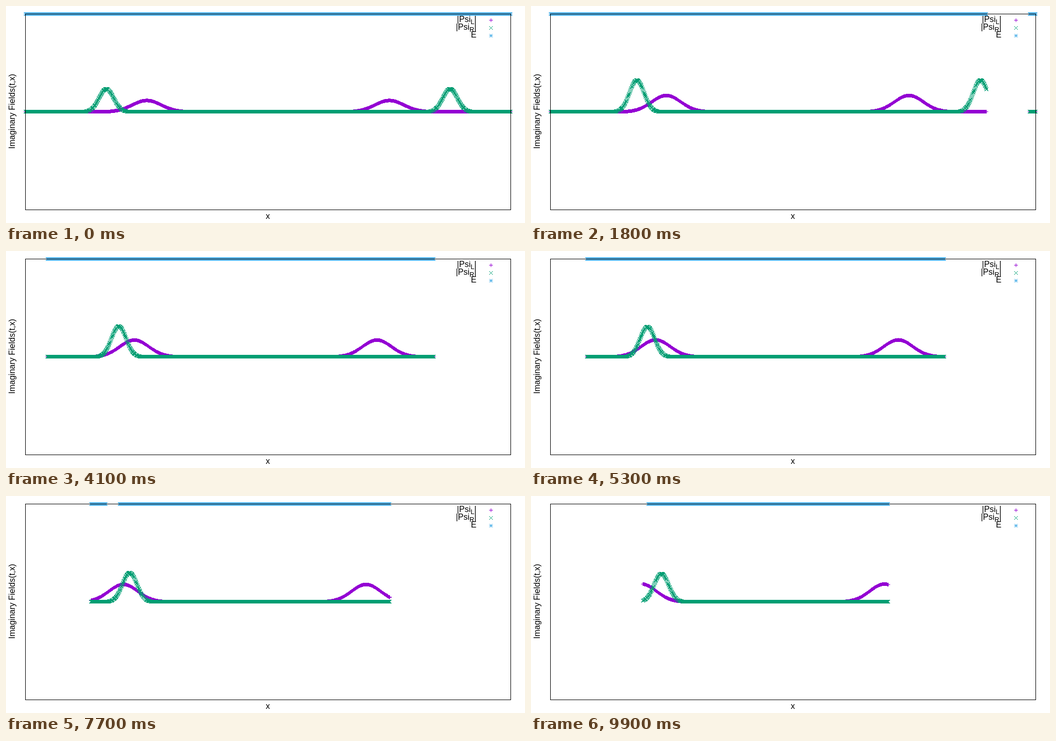
An HTML page with a canvas for the animation above (10000 ms loop, 1000 by 420 pixels).

```html
<!DOCTYPE html>
<html lang="en">
<head>
<meta charset="utf-8">
<title>Imaginary Fields(t,x)</title>
<style>
  html, body { margin: 0; width: 100%; height: 100%; overflow: hidden; background: #fff; }
  canvas, svg { position: absolute; left: 0; top: 0; width: 1000px; height: 420px; }
  text { font: 16px "Liberation Sans", Arial, sans-serif; }
  .sub { font-size: 12.8px; }
  .key { text-anchor: end; }
  .mid { text-anchor: middle; }
</style>
</head>
<body>
<canvas id="plot" width="1000" height="420"></canvas>
<svg viewBox="0 0 1000 420">
  <rect x="37.5" y="15.5" width="935" height="379" fill="none" stroke="#000" shape-rendering="crispEdges"/>
  <text class="key" x="906.5" y="31">|Psi<tspan class="sub" dy="4">L</tspan><tspan dy="-4">|</tspan></text>
  <text class="key" x="906.5" y="46">|Psi<tspan class="sub" dy="4">R</tspan><tspan dy="-4">|</tspan></text>
  <text class="key" x="906.5" y="61">E</text>
  <text class="mid" x="504.5" y="412">x</text>
  <text class="mid" transform="translate(17 204) rotate(-90)">Imaginary Fields(t,x)</text>
</svg>
<script>
const FRAME_MS = 100, FRAMES = 100;
const CELLS = 1600, LEFT = 37, WIDTH = 935, ZERO_Y = 204, TOP_Y = 15;
const STEP = WIDTH / CELLS;
const ctx = document.getElementById('plot').getContext('2d');

// Pixel-exact 7x7 point symbols
function makeMarker(color, plus, cross) {
  const marker = document.createElement('canvas');
  marker.width = marker.height = 7;
  const m = marker.getContext('2d');
  m.fillStyle = color;
  for (let k = 0; k < 7; k++) {
    if (plus) { m.fillRect(k, 3, 1, 1); m.fillRect(3, k, 1, 1); }
    if (cross) { m.fillRect(k, k, 1, 1); m.fillRect(k, 6 - k, 1, 1); }
  }
  return marker;
}
const plus = makeMarker('#9400d3', true, false);
const cross = makeMarker('#009e73', false, true);
const star = makeMarker('#56b4e9', true, true);

const put = (marker, x, y) => ctx.drawImage(marker, x - 3, y - 3);
const gauss = (d, sigma) => Math.exp(-d * d / (2 * sigma * sigma));

// Two equal pulses, positions and width as fractions of the axis
const pulses = (u, a, b, sigma) => gauss(u - a, sigma) + gauss(u - b, sigma);

// Undefined values spread 4 cells per frame from cell 1509, around the ring
function isDefined(i, n) {
  const d = Math.abs(i - 1509);
  return n === 0 || Math.min(d, CELLS - d) >= 4 * n - 1;
}

// E leaves the visible range in a widening gap
function isAboveRange(x, n) {
  return n > 55 && Math.abs(x - 204 - 0.09 * (n - 69)) < Math.sqrt(7.2 * (n - 55));
}

function draw(n) {
  const gain = n === 0 ? Math.SQRT1_2 : 1;
  const ampL = gain * (31.2 + 0.034 * n);
  const ampR = gain * (62.9 - 0.083 * n);
  const shift = n / CELLS;

  function plot(marker, yAt) {
    for (let i = 0; i <= CELLS; i++) {
      if (!isDefined(i, n)) continue;
      const x = LEFT + i * STEP, y = yAt(i / CELLS, x);
      if (y !== null) put(marker, Math.round(x), y);
    }
  }

  ctx.clearRect(0, 0, 1000, 420);
  plot(plus, u => ZERO_Y - Math.floor(ampL * pulses(u + shift, 1 / 4, 3 / 4, 0.03)));
  plot(cross, u => ZERO_Y - Math.floor(ampR * pulses(u - shift, 1 / 6, 7 / 8, 0.015)));
  plot(star, (u, x) => isAboveRange(x, n) ? null : TOP_Y);
  [plus, cross, star].forEach((marker, row) => put(marker, 934, 27 + 15 * row));
}

let shown = -1;
const start = performance.now();
function tick() {
  const n = Math.floor((performance.now() - start) / FRAME_MS) % FRAMES;
  if (n !== shown) draw(shown = n);
  requestAnimationFrame(tick);
}
tick();
</script>
</body>
</html>
```
